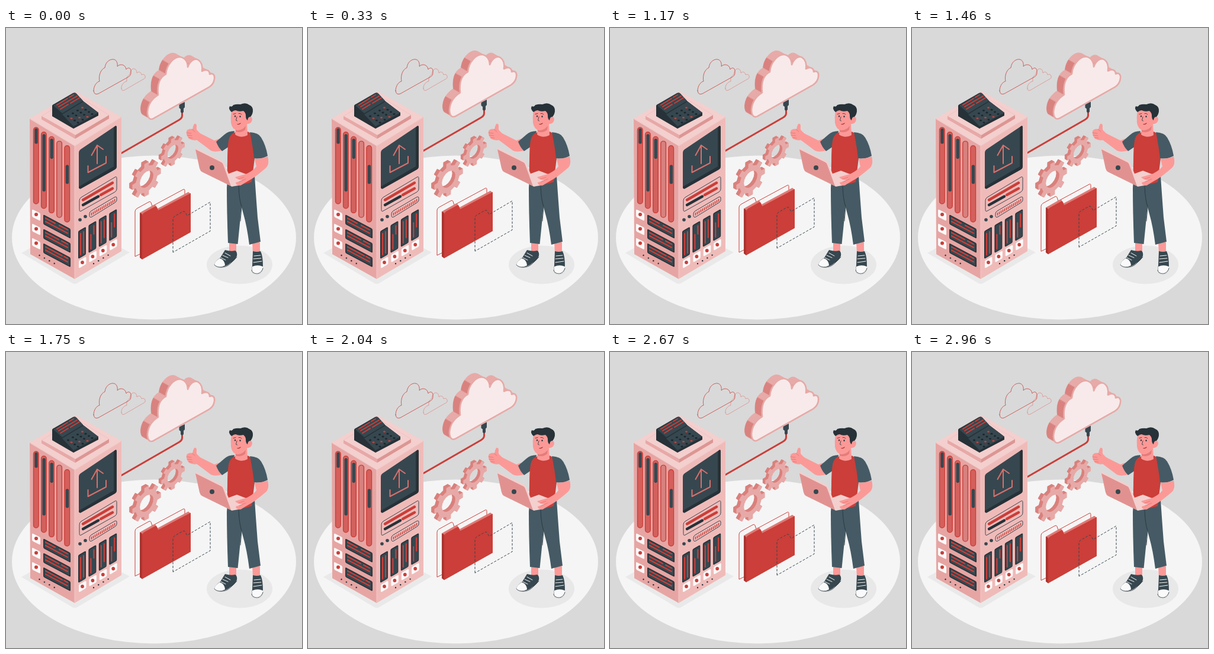
Recreate the animation shown at these times as an HTML page. Size 500x500 px, loop 3 s.

```html
<!DOCTYPE html>
<html>
<head>
<meta charset="utf-8">
<style>
html, body { margin: 0; width: 100%; height: 100%; overflow: hidden; background: #d9d9d9; }
svg { display: block; width: 100vw; height: 100vh; }
</style>
</head>
<body>
<svg id="stage" viewBox="0 0 500 500" stroke-linecap="round" stroke-linejoin="round"></svg>
<script>
const RED = '#cb3e39', DARK = '#37474f', INK = '#263238', ROSE = '#d9807d',
      PINK = '#e7a9a7', PALE = '#f3cfce', SKIN = '#fb9997', SLATE = '#455a64', WHITE = '#fafafa';

const path = (d, fill, extra = '') => `<path d="${d}" fill="${fill}" ${extra}/>`;
const line = (d, stroke, width = 1, extra = '') =>
  `<path d="${d}" fill="none" stroke="${stroke}" stroke-width="${width}" ${extra}/>`;
const dot = (x, y, rx, fill, ry = rx) => `<ellipse cx="${x}" cy="${y}" rx="${rx}" ry="${ry}" fill="${fill}"/>`;
// Box lying on a sloped face, placed by its top left corner
const box = (x, y, w, h, slope, fill, r = 1) =>
  `<rect width="${w}" height="${h}" rx="${r}" fill="${fill}" transform="matrix(1 ${slope} 0 1 ${x} ${y})"/>`;
const times = (n, f) => Array.from({ length: n }, (_, i) => f(i)).join('');

function floor() {
  return dot(250, 354, 240, '#f5f5f5', 138.5) + dot(394.5, 400, 55.5, '#e8e8e8', 32.5) +
    path('M26 380L116 330L209 379L122 430Q117 434 112 431Z', '#e9e9e9');
}

function outlineClouds() {
  return line('M195 102C194 97 199 91 204 90C203 84 206 80 209 79C210 72 213 68 217 69C220 70 221 73 221 76C224 73 228 74 229 79C233 77 236 80 235 84Q234 86 231 87L200 105Q195 107 195 102Z', '#dc8e8b', .8) +
    line('M148 106C148 98 153 91 158 90C156 80 160 70 167 67C168 57 176 52 182 53C187 54 189 60 188 65C192 60 202 61 203 70C207 65 212 68 211 75C211 79 210 81 206 83L156 111Q149 114 148 106Z', RED, .8);
}

function cable() {
  return line('M297.500 142V148Q297.500 152.500 292 155.500L180 220', RED, 3) +
    path('M292.500 129L302 125V134L300 136V142Q297 145 295 142V137L292.500 135Z', DARK);
}

const CLOUD = 'M249 153C243 156 239 152 239 142C240 127 249 118 257 113C255 97 259 83 270 78C271 62 284 48 294 49C303 50 307 58 307 66C311 55 319 50 325 54C331 58 332 66 331 73C338 69 344 71 344 78C350 75 353 80 352 86C351 93 348 97 343 100Z';

function cloud() {
  const curve = document.createElementNS('http://www.w3.org/2000/svg', 'path');
  curve.setAttribute('d', CLOUD);
  const steps = 160, length = curve.getTotalLength();
  const at = i => curve.getPointAtLength(length * i / steps);
  const sides = times(steps, i => {
    const a = at(i), b = at(i + 1);
    const dx = b.x - a.x, dy = b.y - a.y, nx = dy / Math.hypot(dx, dy);
    if (dy * -11.5 + dx * 6.5 < 0) return '';
    const fill = nx < -.84 ? ROSE : PINK;
    return path(`M${a.x} ${a.y}L${b.x} ${b.y}l-11.500 -6.500L${a.x - 11.5} ${a.y - 6.5}Z`, fill, `stroke="${fill}" stroke-width=".6"`);
  });
  return sides + path(CLOUD, '#f8eaea', `stroke="${PINK}" stroke-width="2.600"`);
}

function roof() {
  const base = path('M60 149L118 113L174 147V153L117 187L60 154Z', '#dc9694') +
    path('M60 149L118 113L174 147L117 181Z', PALE) + path('M60 149L117 181V187L60 154Z', PINK);
  const device = path('M78 131Q79 129 82 128L113 110Q117 108 119 111L131 124L156 143V148L114 170L78 149Z', INK) +
    path('M95 146L131 124L156 143L114 166Z', DARK) +
    path('M80 131L115 110Q117 109 119 111L130 123L95 144Z', DARK);
  const bars = line('M86 130L104 119M107 117L114 113M89 133L120 115M92 137L105 129M109 127L124 118', RED, 2);
  const keys = times(16, k => {
    const i = k % 4, j = k >> 2;
    return dot(105 + i * 8 + j * 5.5, 149 - i * 4.8 + j * 3.6, 2, (i * 3 + j) % 4 == 1 ? RED : '#1b262b', 1.4);
  });
  return base + device + bars + keys;
}

function leftFace() {
  const fills = [[0, 26], [2, 97], [2, 34], [0, 0], [31, 32]];
  const slots = times(5, i => {
    const x = 46.5 + i * 13.1, y = 168 + i * 7.7, [from, size] = fills[i];
    return `<rect x="${x}" y="${y}" width="8.600" height="129" rx="4.300" fill="${i == 3 ? ROSE : '#d4605c'}" stroke="${RED}" stroke-width="1.400"/>` +
      (size ? `<rect x="${x + 1.8}" y="${y + from + 1.5}" width="5.400" height="${size}" rx="2.600" fill="${DARK}"/>` : '');
  });
  const drives = times(3, i => {
    const y = 315 + i * 24.2;
    return box(44, y - 9, 14, 13, .5, WHITE, 2) + dot(51, y, 3, RED) +
      box(63, y, 46, 16.5, .53, INK, 2) + box(64.5, y + 2.5, 43, 13, .53, DARK) +
      line(`M67 ${y + 6.5}l${16 + i * 6} ${8.5 + i * 3.2}M67 ${y + 12}l37 19.600M${90 + i * 4} ${y + 18.5 + i * 2}l${14 - i * 4} ${7.4 - i * 2}`, RED, 2.2);
  });
  return slots + drives + times(4, i => dot(56.5 + i * 8.4, 384 + i * 4.6, 1.2, INK));
}

function rightFace() {
  const screen = path('M123 211Q123 207 126 205L184 166Q187 164 187 168V234Q187 237 184 239L127 271Q123 273 123 268Z', DARK) +
    path('M182 168L184 166Q187 164 187 168V234Q187 237 184 239L127 271Q123 273 123 268L182 234Z', INK) +
    line('M154 229V199M144.500 215L154 198L164 205M138.500 233V244L169 228V217', '#d9706c', 2);
  const panel = line('M124 291Q124 288 127 286L184 252Q187 250 187 254V272Q187 275 184 277L127 309Q124 311 124 307Z', DARK) +
    line('M130 290.500L180 261.500', RED, 4.4) + line('M160 282L180 271', RED, 4.4) + line('M130 299L156 284.500', INK, 4.4);
  const vent = line('M141 313Q141 311 144 309L183 286Q187 284 187 287V291Q187 293 184 295L145 319Q141 321 141 317Z', DARK) +
    times(14, i => line(`M${144.5 + i * 3} ${312.5 - i * 1.76}v3.500`, RED, 1.5));
  const bays = times(4, i => {
    const x = 122 + i * 17.4, y = 343 - i * 10;
    return box(x, y, 13, 47, -.56, INK, 2) + box(x + 1.5, y + 1, 10.5, 44, -.56, DARK) +
      line(`M${x + 4} ${y + (i % 2 ? 16 : 4)}V${y + 40}M${x + 9} ${y + 1}v${[36, 14, 30, 22][i]}`, RED, 2.2) +
      box(x + 1, y + 50, 12.5, 13, -.56, WHITE, 2) + dot(x + 7, y + 53, 2.9, RED);
  });
  return screen + panel + dot(125, 324, 2.8, DARK) + dot(134, 318.5, 2.8, DARK) + vent + bays +
    times(4, i => dot(148 + i * 8.2, 398 - i * 4.8, 1.2, INK));
}

function server() {
  return path('M40 153L118 107L195 150L116 199Z', PALE) +
    path('M40 153L116 199V424L41 382Z', '#e6a5a3') +
    path('M116 199L195 150V377L116 424Z', '#efbbb9') +
    line('M41 154L116 199L194 151M116 199V423', '#f4d0cf', .8) + roof() + leftFace() + rightFace();
}

function gear(x, y, r, hole, depth) {
  const profile = [.77, 1, 1, .77], offset = [-.27, -.2, .2, .27];
  const d = times(32, i => {
    const a = (Math.floor(i / 4) + offset[i % 4]) * Math.PI / 4, q = r * profile[i % 4];
    return `${i ? 'L' : 'M'}${(q * Math.cos(a)).toFixed(2)} ${(q * Math.sin(a)).toFixed(2)}`;
  }) + `ZM${hole} 0A${hole} ${hole} 0 1 0 ${-hole} 0A${hole} ${hole} 0 1 0 ${hole} 0Z`;
  const layer = (k, fill) => path(d, fill, `fill-rule="evenodd" transform="matrix(.87 -.5 0 1 ${x - k * .87} ${y - k * .5})"`);
  return times(depth * 2, i => layer(depth - i / 2, ROSE)) + layer(0, PINK);
}

function folder() {
  return line('M226 382L218 386V310Q218 307 221 305L241 294Q244 292 245 295L247 301L299 273Q302 271 302 275V290', RED) +
    path('M226 312L249 299Q252 297 253 300L256 305L308 277L312 280L230 327Z', '#df7975') +
    path('M226 312L230 314V391L226 388Z', '#a93531') +
    path('M230 317Q230 314 233 312L251 302Q254 300 255 303L257 308L312 279V345L230 391Z', RED) +
    line('M282 379V323Q282 320 285 318L299 310Q302 309 303 312L306 317L345 294V343Z', DARK, 1, 'stroke-dasharray="4 2.500" stroke-linecap="butt"');
}

function legs() {
  return path('M377 362H389V378H377ZM416 362H429V380H417Z', SKIN) +
    path('M374 256L402 256L398 300L391.500 365L375 363Q373 310 373 270Z', SLATE) +
    path('M388 256L414 250L420 250Q422 280 425 320L430 361L411 366Q407 335 401 314Q394 290 388 256Z', SLATE) +
    line('M393 268Q394 290 398 302L396 326', INK, .8);
}

function shoes() {
  return path('M370 375Q380 378 387 376Q391 378 390 385Q387 393 379 397C371 405 354 406 352 399Q354 393 362 388Z', DARK) +
    path('M352 399Q354 393 361 389Q369 391 370 401C362 405 354 405 352 399Z', WHITE) +
    path('M417 377Q424 379 430 377Q434 385 434 403C434 413 428 417 422 416C414 415 415 408 416 401Z', DARK) +
    path('M416 403Q425 399 434 403C434 413 428 417 422 416C415 415 415 409 416 403Z', WHITE) +
    line('M366 384L375 388M370 380L379 385M363 388L371 392M419 385L430 384M418 390L431 389M418 396L432 394', WHITE, 1) +
    line('M352 400C356 406 371 406 379 398L390 387M415 409C416 416 430 419 434 406', INK, .8);
}

function head() {
  return path('M388 166L407 160L408 181Q397 187 387 180Z', SKIN) + path('M388 172Q398 173 405 165L404 172Q397 178 388 175Z', '#e57c7a') +
    path('M381 139Q379 150 380 160Q382 172 391 173Q402 172 407 162C416 163 419 151 412 149L410 136Z', SKIN) +
    path('M381 142Q375 137 378 132Q382 134 384 130Q390 128 396 129Q405 125 411 130Q418 133 417 141Q416 147 413 150Q409 149 408 156Q405 154 405 148Q405 143 401 140Q393 142 388 139Q385 139 381 142Z', INK) +
    dot(387, 149, 1.1, INK, 1.6) + dot(395.5, 149.5, 1.1, INK, 1.6) +
    line('M384 145.500L388 144.500M393 144.500Q396 143.500 398 146M390 150L388.500 156L390.500 157', INK, .8) +
    line('M391 162.500Q394 163 396 161', '#a93531', 1.2);
}

function pointingArm() {
  return path('M326 177L352 190L360 187L368 206Q353 211 346 207L322 189Z', SKIN) +
    path('M305 174Q308 169 315 171Q316 165 318 162Q322 161 322 166Q321 172 324 174L329 179L326 188Q318 192 309 187Q304 181 305 174Z', SKIN) +
    line('M305 177L313 178M306 181L314 182M309 185L315 186M314 171L319 175', '#e07472', .8) +
    path('M386 174Q375 174 369 180L355 192Q358 201 365 208L380 198Z', SLATE);
}

function torso() {
  return path('M388 176Q381 177 377 186Q374 196 374 225L373 264Q393 268 415 260L420 220L417 184Q413 176 408 175Q398 185 388 176Z', RED) +
    path('M412 176Q427 177 431 185Q439 198 442 216Q431 222 419 220Q417 200 412 176Z', SLATE);
}

function laptopAndHand() {
  return path('M381 268L398 265L411 249L390 241L368 249Z', PALE) +
    path('M420 221Q433 221 442 217Q446 232 437 238Q420 253 408 259L396 266Q388 266 388 261L400 257Q391 257 387 252L407 246Q417 241 423 234Z', SKIN) +
    line('M394 260L405 255M393 255L402 252', '#e07472', .8) +
    path('M320 204Q321 202 324 204L365 224Q368 226 369 229L384 266Q383 268 380 267L331 243Q328 241 327 237Z', PALE) +
    path('M320 205L364 227Q366 228 367 231L380 267L331 243Q328 241 327 237Z', '#e19290') +
    dot(348, 236, 4, DARK);
}

const person = () => legs() + shoes() + pointingArm() + torso() + head() + laptopAndHand();

const stage = document.getElementById('stage');
stage.innerHTML = floor() + outlineClouds() + `<g id="cloud">${cable()}${cloud()}</g>` + server() +
  gear(237.5, 255.5, 28, 13, 6) + gear(282, 209, 23, 10.5, 5) + `<g id="folder">${folder()}</g>` + person();

const floaters = [['cloud', 1500], ['folder', 3000]].map(([id, period]) => [document.getElementById(id), period]);
const start = performance.now();

function draw(now) {
  const t = Math.max(0, now - start);
  for (const [part, period] of floaters) {
    const phase = t % period / period;
    const lift = 9 * (1 - Math.abs(2 * phase - 1));
    part.setAttribute('transform', `translate(0 ${-lift})`);
  }
  requestAnimationFrame(draw);
}
draw(start);
</script>
</body>
</html>
```
